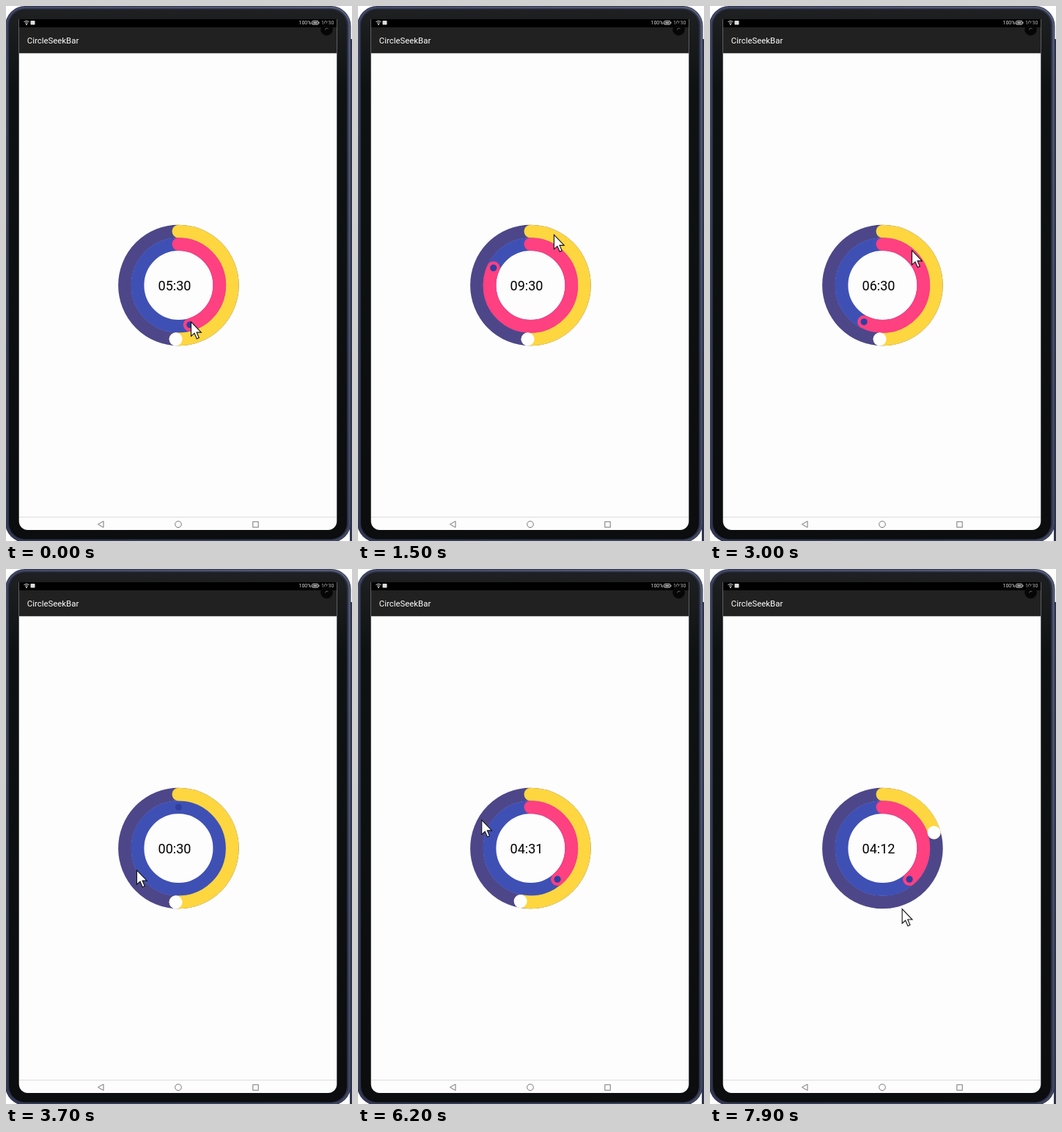
Write an HTML page that moves like this. It is 472 px wide and 728 px high and loops after 8 s.

```html
<!DOCTYPE html>
<html lang="en">
<head>
<meta charset="utf-8">
<title>CircleSeekBar</title>
<style>
  html, body { margin: 0; width: 100%; height: 100%; overflow: hidden; background: #fff; }
  svg { display: block; width: 472px; height: 728px; }
  text { font-family: Roboto, sans-serif; }
</style>
</head>
<body>
<svg viewBox="0 0 472 728">
  <defs>
    <linearGradient id="bezel" x2="0" y2="1">
      <stop offset="0" stop-color="#1e2022"/>
      <stop offset="0.15" stop-color="#0f1213"/>
      <stop offset="1" stop-color="#0b0d0e"/>
    </linearGradient>
    <linearGradient id="rim" x1="0" y1="1" x2="1" y2="0">
      <stop offset="0" stop-color="#333853"/>
      <stop offset="0.5" stop-color="#424861"/>
      <stop offset="1" stop-color="#565d75"/>
    </linearGradient>
  </defs>

  <!-- Tablet -->
  <path d="M469 45h3v683h-3z" fill="#30354f"/>
  <rect x="-1" width="471.5" height="730" rx="27" fill="#2b3049"/>
  <rect x="1" y="2" width="467.500" height="726" rx="25" fill="none" stroke="url(#rim)" stroke-width="2.500"/>
  <rect x="4" y="4.500" width="461" height="721" rx="22" fill="url(#bezel)"/>
  <path d="M17.700 18H451.300V701a12 12 0 0 1-12 12H29.700a12 12 0 0 1-12-12z" fill="#fdfdfd"/>
  <path d="M18 18H451V29H18z" fill="#000"/>
  <path d="M18 29H451V64H18z" fill="#212121"/>
  <path d="M18 64.500H451" stroke="#bbb"/>

  <!-- Status and title bars -->
  <g fill="none" stroke="#ddd">
    <path d="M24.500 21.500q3.500-2.500 7 0M26 23.300q2-1.400 4 0"/>
    <rect x="417.500" y="20.500" width="8.500" height="4.500" rx="1"/>
  </g>
  <g fill="#ddd">
    <circle cx="28" cy="25" r="1"/>
    <rect x="33.500" y="20" width="6" height="5.500" rx="0.800"/>
    <path d="M419 22h5.500v1.600H419zM426.500 22h1v1.500h-1z"/>
    <text x="399.500" y="25.300" font-size="7">100%</text>
    <text x="430" y="25.300" font-size="7" fill="#bbb">10:30</text>
  </g>
  <circle cx="437.500" cy="32" r="8.300" fill="#060607"/>
  <path d="M435.500 32.500a2.300 2.300 0 0 1 4-1.500" fill="none" stroke="#66686b"/>
  <text x="28.800" y="51.300" font-size="11.400" fill="#fff">CircleSeekBar</text>

  <!-- Navigation bar -->
  <path d="M18 695.500H451" stroke="#dcdcdc"/>
  <g fill="none" stroke="#777">
    <path d="M133 701v8.500l-7.500-4.250z"/>
    <circle cx="235" cy="705.300" r="4.300"/>
    <rect x="336.800" y="701.800" width="7.400" height="7.400"/>
  </g>

  <!-- Dial -->
  <g transform="translate(235.400 380) rotate(-90)" fill="none" stroke-width="17.800" stroke-linecap="round">
    <circle r="73.400" stroke="#4d4789"/>
    <circle r="55.900" stroke="#3f50b5"/>
    <circle id="minuteArc" r="73.400" stroke="#fdd640" pathLength="360"/>
    <circle id="hourArc" r="55.900" stroke="#ff4081" pathLength="360"/>
  </g>
  <circle id="minuteKnob" r="9" fill="#fff"/>
  <circle id="hourKnob" r="4.600" fill="#303f9f"/>
  <text id="clock" x="230" y="387" font-size="18" text-anchor="middle" fill="#000"></text>
  <path id="cursor" d="M.5 .5V20L5 16 8.300 23.500 11.300 22.200 8.100 14.800H14.300z" fill="#fff" stroke="#111" stroke-width="1.100"/>
</svg>
<script>
const LOOP = 8000, STEP = 100, CX = 235.4, CY = 380;
const HOUR_R = 55.9, MINUTE_R = 73.4;

// Turning points: [ms, degrees clockwise from the top, radius]
const hourDrag = [
  [200, 161.4, 52], [1500, 384.5, 76], [2200, 527, 59.5], [3700, 963, 64.5],
  [4400, 1218, 70], [4700, 1218, 70], [5300, 1263, 73]
];
const hourTurn = [[800, 164], [1500, 295], [2200, 392], [3700, 720], [4600, 1211], [5000, 1219]];

const el = id => document.getElementById(id);
const pad = n => String(Math.floor(n)).padStart(2, "0");
const progress = (t, start, end) => Math.min(1, Math.max(0, (t - start) / (end - start)));
const mix = (a, b, f) => a + (b - a) * f;

function follow(keys, t) {
  const next = keys.findIndex(k => k[0] > t);
  if (next === 0) return keys[0];
  if (next < 0) return keys[keys.length - 1];
  const a = keys[next - 1], b = keys[next];
  const f = progress(t, a[0], b[0]);
  return a.map((v, i) => mix(v, b[i], f));
}

function place(node, angle, radius) {
  const rad = angle * Math.PI / 180;
  const x = CX + radius * Math.sin(rad), y = CY - radius * Math.cos(rad);
  node.setAttribute("transform", `translate(${x} ${y})`);
}

function setHand(name, angle, radius) {
  const arc = el(name + "Arc");
  arc.style.display = angle < 0.5 ? "none" : "";
  arc.setAttribute("stroke-dasharray", `${angle} 720`);
  place(el(name + "Knob"), angle, radius);
}

function draw(now) {
  const t = Math.floor(now % LOOP / STEP) * STEP;

  // The minute hand trails the cursor's second drag
  const hour = follow(hourTurn, t)[1] % 360;
  const minute = mix(183, 433, progress(t, 6100, 7900) ** 1.2) % 360;
  setHand("hour", hour, HOUR_R);
  setHand("minute", minute, MINUTE_R);
  el("clock").textContent = `${pad(hour / 30)}:${pad(minute / 6)}`;

  const [, angle, radius] = follow(hourDrag, t);
  const sweep = 1 - (1 - progress(t, 5600, 7900)) ** 1.4;
  place(el("cursor"), angle + 339.3 * sweep, radius + 13.3 * sweep);
}

function tick() {
  draw(performance.now());
  requestAnimationFrame(tick);
}
tick();
</script>
</body>
</html>
```
